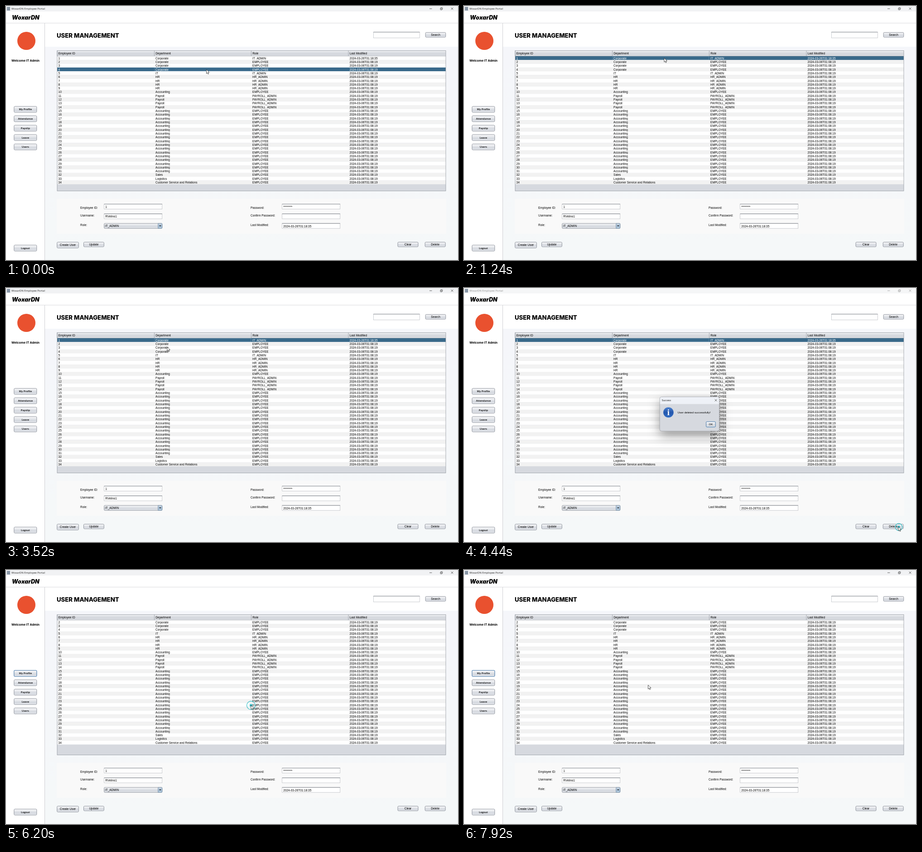
Write an HTML page with a canvas that moves like this. It is 998 px wide and 561 px high and loops after 8.68 s.

```html
<!DOCTYPE html>
<html lang="en">
<head>
<meta charset="utf-8">
<title>Employee Portal</title>
<style>
html, body { margin: 0; width: 100%; height: 100%; overflow: hidden; background: #fff; }
canvas { display: block; width: 998px; height: 561px; }
</style>
</head>
<body>
<canvas id="stage"></canvas>
<script>
const W = 998, H = 561, LOOP = 8680, STEP = 40;
const ROW_TOP = 110.9, ROW_H = 8.318;
const SANS = '"Liberation Sans", Arial, sans-serif';
const UI = '"Open Sans", sans-serif';
const HEAD = 'Inter, sans-serif';
const COLS = [113, 327.5, 541.5, 756];
const BRAND = 'WoxarDN';

const canvas = document.getElementById('stage');
const ctx = canvas.getContext('2d');
const dpr = window.devicePixelRatio || 1;
canvas.width = W * dpr;
canvas.height = H * dpr;

// Pointer path: time, x, y
const PATH = [
  [0, 442.5, 140.3], [160, 442.5, 139.8], [360, 442.5, 132], [480, 442.5, 132],
  [640, 442.5, 124], [1000, 442.5, 124], [1240, 442, 115], [1320, 442, 115],
  [1560, 441, 114.5], [1720, 441, 114.5], [2480, 160, 526], [2600, 157, 526],
  [2900, 190, 500], [3480, 328, 112], [3800, 978, 535], [3960, 960, 528],
  [4160, 960, 528], [4280, 959, 527.5], [4720, 959, 527], [5040, 937, 515],
  [5400, 495, 297], [5560, 539.5, 299], [5840, 541, 299], [6560, 541, 299],
  [7000, 330, 172], [7440, 200, 168], [7560, 158, 270], [7680, 225, 374],
  [7920, 406.5, 254], [LOOP, 406.5, 254]
];
const CLICKS = [[4320, 960, 528], [6000, 541, 299]];
const OPEN = 4360, CLOSE = 6080, DELETED = 6120;

const clamp = v => Math.max(0, Math.min(1, v));
const easeOut = p => 1 - (1 - p) * (1 - p);
const smooth = p => p * p * (3 - 2 * p);

function pointer(t) {
  let i = 1;
  while (i < PATH.length - 1 && t > PATH[i][0]) i++;
  const [t0, x0, y0] = PATH[i - 1], [t1, x1, y1] = PATH[i];
  const p = smooth(clamp((t - t0) / (t1 - t0)));
  return { x: x0 + (x1 - x0) * p, y: y0 + (y1 - y0) * p };
}

function box(x, y, w, h, fill) {
  ctx.fillStyle = fill;
  ctx.fillRect(x, y, w, h);
}

function line(x0, y0, x1, y1, color, width = 0.7) {
  ctx.strokeStyle = color;
  ctx.lineWidth = width;
  ctx.beginPath();
  ctx.moveTo(x0, y0);
  ctx.lineTo(x1, y1);
  ctx.stroke();
}

function disc(x, y, r, fill) {
  ctx.fillStyle = fill;
  ctx.beginPath();
  ctx.arc(x, y, r, 0, Math.PI * 2);
  ctx.fill();
}

// y is the middle of the capitals
function text(s, x, y, size = 6.45, { font = SANS, style = '', color = '#000', align = 'left' } = {}) {
  ctx.font = `${style} ${size}px ${font}`;
  ctx.fillStyle = color;
  ctx.textAlign = align;
  ctx.fillText(s, x, y + size * 0.36);
}

function shade(y, h, ...colors) {
  const g = ctx.createLinearGradient(0, y, 0, y + h);
  colors.forEach((c, i) => g.addColorStop(i / (colors.length - 1), c));
  return g;
}

function panel(x, y, w, h, r, fill, stroke, width = 0.8) {
  ctx.beginPath();
  ctx.roundRect(x, y, w, h, r);
  ctx.fillStyle = fill;
  ctx.fill();
  if (stroke) {
    ctx.strokeStyle = stroke;
    ctx.lineWidth = width;
    ctx.stroke();
  }
}

function button(label, x, y, w, h, opts = {}) {
  const { focus = false, size = 6.5, ...type } = opts;
  if (focus) panel(x - 0.6, y - 0.6, w + 1.2, h + 1.2, 2.6, '#73a4d1');
  panel(x, y, w, h, 2, shade(y, h, '#fbfbfc', '#e6e8ec', '#d3d7de', '#eceef2'),
    focus ? '#3f6e9c' : '#777d88');
  text(label, x + w / 2, y + h / 2, size, { align: 'center', ...type });
}

function field(value, x, y, w, h = 11) {
  box(x, y, w, h, '#fff');
  ctx.strokeStyle = '#b4b7bd';
  ctx.lineWidth = 0.7;
  ctx.strokeRect(x, y, w, h);
  line(x, y, x + w, y, '#777b83', 0.9);
  text(value, x + 2.6, y + h / 2 + 0.5);
}

function windowBar(active) {
  box(0, 0, W, 12, active ? '#f1f2f4' : '#f5f6f7');
  const ink = active ? '#222' : '#8b8b8b';
  panel(2, 2, 7, 8, 0, '#8795a5');
  text(BRAND + ' Employee Portal', 12, 6.2, 6, { font: UI, color: ink });
  line(935, 6, 940.5, 6, ink);
  panel(959, 4.4, 4, 4, 0.7, 'transparent', ink, 0.7);
  panel(960.2, 3.3, 3.8, 3.8, 0.7, 'transparent', ink, 0.4);
  cross(985, 5.8, 2.4, ink);
}

function cross(x, y, r, color) {
  line(x - r, y - r, x + r, y + r, color);
  line(x - r, y + r, x + r, y - r, color);
}

function sidebar(profileFocus) {
  disc(45, 77, 20, '#e9512f');
  text('Welcome IT Admin', 43, 120.3, 6.8, { font: HEAD, style: '700', align: 'center' });
  const type = { font: UI, style: '600', size: 5.9 };
  ['My Profile', 'Attendance', 'Payslip', 'Leave', 'Users'].forEach((s, i) =>
    button(s, 17.8, 221.7 + i * 20.75, 50, 13.2, { ...type, focus: profileFocus && i === 0 }));
  button('Logout', 17.8, 528, 50, 13.3, type);
}

function department(id) {
  if (id < 5) return 'Corporate';
  if (id === 5) return 'IT';
  if (id < 10) return 'HR';
  if (id > 10 && id < 15) return 'Payroll';
  if (id < 32) return 'Accounting';
  return ['Sales', 'Logistics', 'Customer Service and Relations'][id - 32];
}

function role(id) {
  if (id === 1 || id === 5) return 'IT_ADMIN';
  if (id > 5 && id < 10) return 'HR_ADMIN';
  return id > 10 && id < 15 ? 'PAYROLL_ADMIN' : 'EMPLOYEE';
}

function table(first, selected) {
  box(113, 98.5, 858, 310, '#d6d9df');
  box(113, 98.5, 858, 12, shade(98.5, 12, '#f2f3f5', '#dddfe4', '#d2d5db', '#e2e5e9'));
  ['Employee ID', 'Department', 'Role', 'Last Modified'].forEach((s, i) => {
    text(s, COLS[i] + 2.7, 104.8);
    line(COLS[i], 98.5, COLS[i], 110.5, '#8b9099');
  });
  line(113, 110.6, 971, 110.6, '#8b9099');
  for (let id = first; id <= 34; id++) {
    const i = id - first, y = ROW_TOP + i * ROW_H, on = i === selected;
    box(113, y, 858, ROW_H, on ? '#39698a' : i % 2 ? '#f2f2f2' : '#fff');
    if (on) {
      ctx.strokeStyle = '#6f98b5';
      ctx.lineWidth = 0.6;
      ctx.strokeRect(COLS[1] + 0.4, y + 0.4, 213, ROW_H - 0.8);
    }
    const stamp = id === 1 ? '2024-03-26T01:18:35' : '2024-03-06T01:08:19';
    [id, department(id), role(id), stamp].forEach((s, c) =>
      text(s, COLS[c] + 2.6, y + 4.4, 6.45, { color: on ? '#fff' : '#000' }));
  }
  ctx.strokeStyle = '#92979f';
  ctx.lineWidth = 0.8;
  ctx.strokeRect(113, 98.5, 858, 310);
}

function form() {
  box(112, 426, 860, 77, '#f9f9f9');
  const ys = [446, 462.8, 483.8];
  ['Employee ID:', 'Username:', 'Role:'].forEach((s, i) => text(s, 164, ys[i]));
  ['Password:', 'Confirm Password:', 'Last Modified:'].forEach((s, i) => text(s, 540, ys[i]));
  field('1', 216.7, 437.5, 128);
  field('RVelino1', 216.7, 459, 128);
  field('********', 609.7, 437.5, 128);
  field('', 609.7, 459, 128);
  field('2024-03-26T01:18:35', 609.7, 480.2, 128);
  panel(216.7, 480.2, 128, 11, 1.5, shade(480, 11, '#fafafb', '#e4e7eb', '#d3d7de', '#e9ebef'), '#777d88');
  panel(335.8, 480.2, 8.9, 11, [0, 1.5, 1.5, 0], shade(480, 11, '#dbe5ee', '#a3bcd4', '#b8cee0'), '#5d7a96', 0.7);
  ctx.fillStyle = '#111';
  ctx.beginPath();
  ctx.moveTo(338.4, 484.6);
  ctx.lineTo(342.2, 484.6);
  ctx.lineTo(340.3, 487.3);
  ctx.fill();
  text('IT_ADMIN', 219, 486.1);
  button('Create User', 112.7, 521.5, 47.6, 13, { size: 6.6 });
  button('Update', 171.5, 521.5, 44.8, 10.4);
  button('Clear', 865, 521.5, 45, 10.4);
  button('Delete', 925.2, 521.5, 45, 10.4);
}

function dialog(t) {
  if (t < OPEN || t >= CLOSE + 100) return;
  const shown = easeOut(clamp((t - OPEN) / 200));
  const gone = clamp((t - CLOSE) / 100);
  const scale = 0.9 + 0.1 * shown - 0.06 * gone;
  ctx.save();
  ctx.globalAlpha = clamp((t - OPEN + 30) / 110) * (1 - gone);
  ctx.translate(472, 265);
  ctx.scale(scale, scale);
  ctx.translate(-472, -265);
  ctx.shadowColor = 'rgba(0,0,0,0.38)';
  ctx.shadowBlur = 24 * dpr;
  ctx.shadowOffsetY = 10 * dpr;
  panel(430.7, 239.6, 136.3, 78.4, 4, '#d6d9df');
  ctx.shadowColor = 'transparent';
  panel(430.7, 239.6, 136.3, 16.4, [4, 4, 0, 0], '#eef1f7');
  panel(430.7, 239.6, 136.3, 78.4, 4, 'transparent', '#8e9198', 0.6);
  text('Success', 435.5, 247.8, 5.8, { font: UI });
  cross(559.2, 247.3, 2.5, '#222');
  disc(450.6, 275.2, 12.2, '#b9c7dc');
  disc(450.6, 275.2, 11.7, shade(263, 24, '#4f83cf', '#2457ad', '#2f6cc4'));
  text('i', 450.6, 274.8, 19, { font: '"Liberation Serif", serif', style: 'bold', color: '#fff', align: 'center' });
  text('User deleted successfully!', 471.5, 275.3, 6.5);
  button('OK', 537, 296.4, 21.3, 12, { focus: true });
  ctx.restore();
}

function ripple(t) {
  for (const [start, x, y] of CLICKS) {
    const age = t - start;
    if (age < 0 || age >= 320) continue;
    const r = 3 + 7.2 * easeOut(clamp(age / 240));
    ctx.save();
    ctx.globalAlpha = 1 - clamp((age - 220) / 100);
    ctx.strokeStyle = '#35c0c8';
    ctx.lineWidth = 1.2;
    ctx.beginPath();
    ctx.arc(x, y, r - 0.6, 0, Math.PI * 2);
    ctx.stroke();
    disc(x, y, r * 0.45, 'rgba(37,184,194,0.25)');
    disc(x, y, 2.4, '#16a9b5');
    ctx.restore();
  }
}

function arrow({ x, y }) {
  ctx.save();
  ctx.translate(x, y);
  ctx.beginPath();
  [[0, 0], [0, 9], [2.1, 7.1], [3.5, 10.2], [5, 9.6], [3.6, 6.5], [6.4, 6.4]]
    .forEach(p => ctx.lineTo(...p));
  ctx.closePath();
  ctx.fillStyle = '#fff';
  ctx.fill();
  ctx.strokeStyle = '#222';
  ctx.lineWidth = 0.75;
  ctx.stroke();
  ctx.restore();
}

function draw(t) {
  const mouse = pointer(t);
  const deleted = t >= DELETED;
  const row = t < 1600 ? Math.floor((mouse.y - ROW_TOP) / ROW_H) : 0;
  ctx.setTransform(dpr, 0, 0, dpr, 0, 0);
  box(0, 0, W, H, '#fff');
  box(86, 90, W - 86, H - 90, shade(90, H - 90, '#f5f6fa', '#f5f8f9'));
  windowBar(t < OPEN || t >= CLOSE);
  text(BRAND, 13, 25, 12.6, { font: HEAD, style: 'italic 900' });
  line(0, 37.8, W, 37.8, '#c9cace');
  line(85.5, 38, 85.5, H, '#b9bbc1');
  sidebar(deleted);
  text('USER MANAGEMENT', 112, 64.8, 13.2, { font: HEAD, style: '800' });
  field('', 811.3, 57.7, 102, 12.7);
  button('Search', 926.2, 58.4, 44.6, 10.6);
  table(deleted ? 2 : 1, deleted ? -1 : row);
  form();
  dialog(t);
  ripple(t);
  arrow(mouse);
}

function tick() {
  const t = performance.now() % LOOP;
  draw(Math.floor(t / STEP) * STEP);
  requestAnimationFrame(tick);
}
tick();
</script>
</body>
</html>
```
